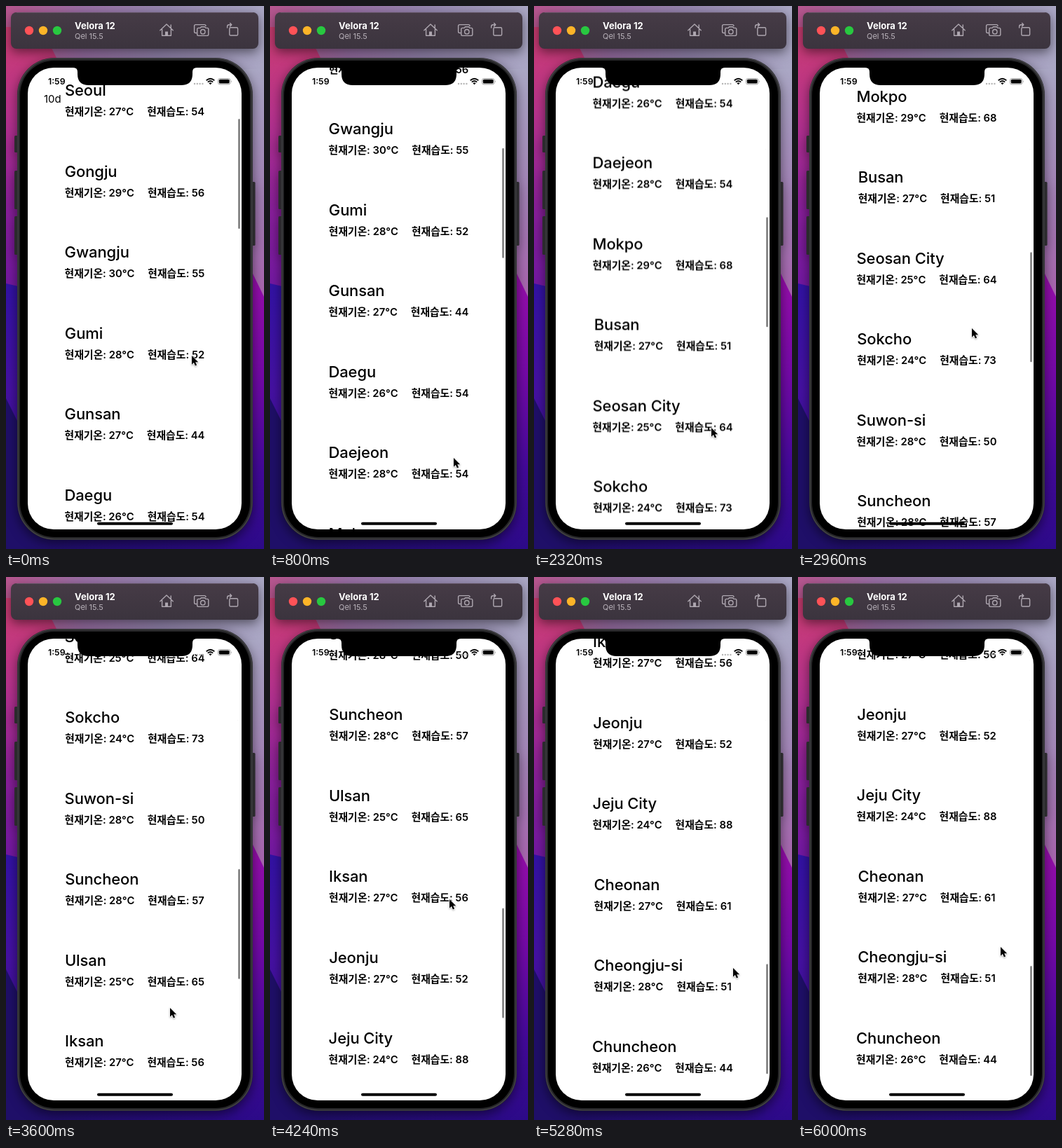
Animation, 368 px wide and 775 px high, one loop 6.08 s. Source, as an HTML page:

```html
<!DOCTYPE html>
<html lang="ko">
<head>
<meta charset="utf-8">
<title>Weather list</title>
<style>
  html, body { margin: 0; width: 100%; height: 100%; overflow: hidden; }
  body { position: relative; background: #2a0e86; font-family: Inter, "Noto Sans CJK KR", "Noto Sans CJK", sans-serif; color: #000; }
  svg { position: absolute; left: 0; top: 0; width: 368px; height: 775px; }
  #screen { position: absolute; left: 31px; top: 88px; width: 305px; height: 659px; border-radius: 37px; overflow: hidden; background: #fff; }
  #list { position: absolute; left: 0; top: 0; width: 100%; will-change: transform; }
  .row { position: absolute; left: 50%; transform: translateX(-50%); width: max-content; }
  .city { font-size: 22px; font-weight: 500; line-height: 30px; letter-spacing: -.1px; }
  .facts { display: flex; gap: 19px; margin-top: 6px; font-size: 14.8px; font-weight: 600; line-height: 20px; white-space: pre; }
  #code { position: absolute; left: 23px; top: 35px; font-size: 15px; line-height: 20px; }
  #bar { position: absolute; left: 300px; top: 73px; width: 3px; height: 157px; border-radius: 2px; background: #8c8c8c; }
  .shade { filter: drop-shadow(0 5px 8px rgba(0, 0, 0, .5)); }
</style>
</head>
<body>
<svg viewBox="0 0 368 775">
  <defs>
    <linearGradient id="top">
      <stop offset="0" stop-color="#b8568f"/><stop offset=".3" stop-color="#9a70a6"/>
      <stop offset=".6" stop-color="#9687b0"/><stop offset="1" stop-color="#aaa7c4"/>
    </linearGradient>
    <linearGradient id="left" x2="0" y2="1">
      <stop offset="0" stop-color="#cb3d70"/><stop offset=".3" stop-color="#b8338c"/>
      <stop offset=".65" stop-color="#8a1f9c"/><stop offset="1" stop-color="#6c16a2"/>
    </linearGradient>
    <linearGradient id="right" x2="0" y2="1">
      <stop offset="0" stop-color="#aaa7c4"/><stop offset=".45" stop-color="#a488b9"/><stop offset="1" stop-color="#a861ae"/>
    </linearGradient>
    <linearGradient id="magenta" x2="0" y2="1">
      <stop offset="0" stop-color="#a911ad"/><stop offset=".45" stop-color="#7609a8"/>
      <stop offset=".75" stop-color="#43099a"/><stop offset="1" stop-color="#2c0a88"/>
    </linearGradient>
    <linearGradient id="blue" x2="0" y2="1">
      <stop offset="0" stop-color="#3212a4"/><stop offset=".4" stop-color="#4511a2"/><stop offset="1" stop-color="#270d86"/>
    </linearGradient>
    <linearGradient id="floor">
      <stop offset="0" stop-color="#1f0f68"/><stop offset="1" stop-color="#2c0a88"/>
    </linearGradient>
    <linearGradient id="title" x2="0" y2="1">
      <stop offset="0" stop-color="#463b46"/><stop offset="1" stop-color="#3b343e"/>
    </linearGradient>
  </defs>
  <path fill="url(#top)" d="M0 0H368V180H0Z"/>
  <path fill="url(#left)" d="M0 30H50L90 110V430H0Z"/>
  <path fill="url(#right)" d="M340 90H368V425H310V130Z"/>
  <path fill="url(#blue)" d="M0 396L60 410V775H0Z"/>
  <path fill="#1f0f68" d="M0 560L20 600L60 775H0Z"/>
  <path fill="url(#magenta)" d="M310 310L352 382L368 415V775H310Z"/>
  <path fill="url(#floor)" d="M40 740H330V775H40Z"/>

  <g class="shade">
    <g fill="#2b2a2d">
      <rect x="12" y="185" width="6" height="24" rx="1.5"/>
      <rect x="12" y="235" width="6" height="55" rx="1.5"/>
      <rect x="12" y="300" width="6" height="55" rx="1.5"/>
      <rect x="350" y="251" width="5.5" height="91" rx="1.5"/>
    </g>
    <rect x="16" y="74" width="336" height="688" rx="53" fill="#262628"/>
  </g>
  <rect x="17.2" y="75.2" width="333.6" height="685.6" rx="52" fill="none" stroke="#444447" stroke-width="1.3"/>
  <rect x="20" y="78" width="328" height="680" rx="49"/>
  <rect class="shade" x="7" y="9" width="353" height="52" rx="8" fill="url(#title)"/>
</svg>

<div id="screen">
  <div id="list"></div>
  <div id="bar"></div>
</div>

<svg viewBox="0 0 368 775">
  <path d="M96 87V88Q102 88 102 94V97Q102 113 118 113H250Q266 113 266 97V94Q266 88 272 88V87Z"/>
  <text x="60" y="112.2" font-size="12.3" font-weight="600">1:59</text>
  <g fill="#b5b5b5">
    <circle cx="269" cy="111" r="1.2"/><circle cx="272.8" cy="111" r="1.2"/>
    <circle cx="276.6" cy="111" r="1.2"/><circle cx="280.4" cy="111" r="1.2"/>
  </g>
  <g fill="none" stroke="#000" stroke-width="1.8">
    <path d="M285.7 106.3Q291.5 101.2 297.3 106.3M287.8 108.6Q291.5 105.4 295.2 108.6"/>
  </g>
  <path d="M289.4 110.2Q291.5 108.5 293.6 110.2L291.5 112.3Z"/>
  <rect x="302.5" y="103.5" width="17.4" height="8.4" rx="2.6" fill="none" stroke="#999" stroke-width=".9"/>
  <rect x="303.8" y="104.8" width="14.8" height="5.8" rx="1.5"/>
  <path fill="#999" d="M321 106Q322.6 107.7 321 109.4Z"/>
  <rect x="130" y="736.8" width="108" height="4" rx="2"/>

  <path d="M15 9.5H352" stroke="#67596a" stroke-width=".8"/>
  <circle cx="33" cy="35" r="6.2" fill="#ff5257"/>
  <circle cx="53" cy="35" r="6.2" fill="#fdb428"/>
  <circle cx="73" cy="35" r="6.2" fill="#28c840"/>
  <text x="98" y="33" font-size="13" font-weight="700" fill="#fff">Velora 12</text>
  <text x="98" y="47" font-size="11" fill="#b9b2ba">Qel 15.5</text>
  <g fill="none" stroke="#aea7b0" stroke-width="1.4" stroke-linejoin="round" stroke-linecap="round">
    <path d="M219.8 34.8L229 26L238.2 34.8M222.6 33V42.3H235.4V33M235.2 31V27"/>
    <path fill="#aea7b0" stroke="none" d="M227 36.5H231V42H227Z"/>
    <path d="M271.5 38.5H270.5Q268.6 38.5 268.6 36.5V28.6Q268.6 26.6 270.5 26.6H283Q285 26.6 285 28.4"/>
    <path d="M274.5 31.4H277L278.5 29.7H283.5L285 31.4H287Q288.8 31.4 288.8 33.2V40.6Q288.8 42.4 287 42.4H274.5Q272.7 42.4 272.7 40.6V33.2Q272.7 31.4 274.5 31.4Z"/>
    <circle cx="280.8" cy="36.7" r="3.2"/>
    <rect x="318.8" y="30.8" width="11.8" height="11.2" rx="1.6"/>
    <path d="M315.6 31V29.4Q315.6 26.8 318.4 26.8H321.4M319.6 24.6L321.8 26.8L319.6 29"/>
  </g>

  <g id="cursor">
    <path d="M0 0V12.7L2.9 10L4.9 14.6L7.1 13.6L5.2 9.2H9.2Z" stroke="#fff" stroke-width="1.3" stroke-linejoin="round" paint-order="stroke" style="filter: drop-shadow(0 1px 1px rgba(0, 0, 0, .3))"/>
  </g>
</svg>

<script>
const LOOP = 6080, STEP = 80, PITCH = 115.5;
const cities = `Seoul,27,54 Gongju,29,56 Gwangju,30,55 Gumi,28,52 Gunsan,27,44
  Daegu,26,54 Daejeon,28,54 Mokpo,29,68 Busan,27,51 Seosan_City,25,64
  Sokcho,24,73 Suwon-si,28,50 Suncheon,28,57 Ulsan,25,65 Iksan,27,56
  Jeonju,27,52 Jeju_City,24,88 Cheonan,27,61 Cheongju-si,28,51 Chuncheon,26,44`
  .split(/\s+/).map(s => s.replace('_', ' ').split(','));

// time, scroll offset, pointer x, pointer y
const keys = [
  [0, 0, 265, 499], [240, 105, 266, 455], [800, 176, 262, 645],
  [1280, 178, 266, 640], [1440, 230, 269, 578], [1680, 400, 268, 470],
  [2320, 589.5, 253, 602], [2640, 605, 251, 610], [2960, 800, 248, 460],
  [3600, 1075, 234, 615], [3920, 1095, 238, 618], [4240, 1310, 256, 460],
  [4800, 1583, 280, 567], [5280, 1645, 284, 558], [6000, 1657, 289, 528]
];

const $ = id => document.getElementById(id);
const list = $('list'), bar = $('bar'), cursor = $('cursor');

list.innerHTML = '<div id="code">10d</div>' + cities.map(([name, temp, humid], i) =>
  `<div class="row" style="top:${17 + i * PITCH}px"><div class="city">${name}</div>` +
  `<div class="facts"><span>현재기온: ${temp}°C</span><span>현재습도: ${humid}</span></div></div>`).join('');

// Monotone cubic: no overshoot between keys
function slope(i, c) {
  if (!i || i === keys.length - 1) return 0;
  const rate = j => (keys[j + 1][c] - keys[j][c]) / (keys[j + 1][0] - keys[j][0]);
  const a = rate(i - 1), b = rate(i);
  return a * b > 0 ? 2 * a * b / (a + b) : 0;
}

function value(t, c) {
  let i = 0;
  while (i < keys.length - 2 && t >= keys[i + 1][0]) i++;
  const a = keys[i], b = keys[i + 1], span = b[0] - a[0];
  const u = Math.min(1, (t - a[0]) / span), v = 1 - u;
  return v * v * (1 + 2 * u) * a[c] + u * u * (3 - 2 * u) * b[c]
    + span * u * v * (v * slope(i, c) - u * slope(i + 1, c));
}

const start = performance.now();
function draw() {
  const now = Math.max(0, performance.now() - start) % LOOP;
  const t = Math.floor(now / STEP) * STEP;
  const scroll = value(t, 1);
  list.style.transform = `translateY(${-scroll}px)`;
  bar.style.transform = `translateY(${scroll * 0.2378}px)`;
  cursor.setAttribute('transform', `translate(${value(t, 2)} ${value(t, 3)})`);
  requestAnimationFrame(draw);
}
draw();
</script>
</body>
</html>
```
